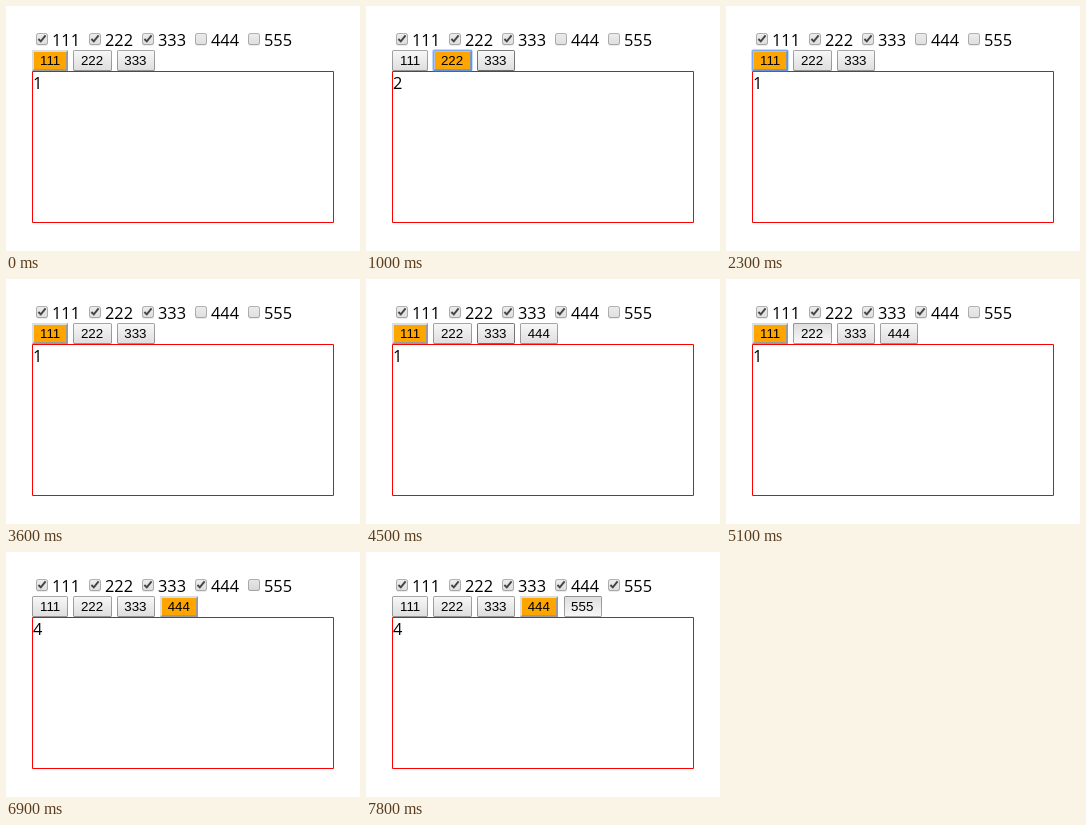
An HTML page with a canvas that plays this animation: 354 by 245 pixels, repeating every 8000 ms.

```html
<!DOCTYPE html>
<html lang="en">
<head>
<meta charset="utf-8">
<title>Checkbox tabs</title>
<style>
  html, body { margin: 0; width: 100%; height: 100%; overflow: hidden; background: #fff; }
  canvas { display: block; }
</style>
</head>
<body>
<canvas id="stage" width="354" height="245"></canvas>
<script>
const ctx = document.getElementById('stage').getContext('2d');
const LOOP = 8000;
const LABELS = ['111', '222', '333', '444', '555'];
const LABEL_FONT = '16.4px "Open Sans", "Noto Sans", sans-serif';
const BUTTON_FONT = '13.333px "Liberation Sans", Arial, sans-serif';
const RING = '77,144,254';
const NONE = -1;

const START = {
  tab: 0, hover: NONE, press: NONE, focus: NONE,
  boxHover: NONE, boxPress: NONE, checked: 3
};

const hover = i => ({ hover: i });
const press = i => ({ hover: i, press: i });
const click = i => ({ hover: i, press: NONE, focus: i, tab: i });
const pressBox = i => ({ hover: NONE, focus: NONE, boxPress: i });
const check = i => ({ boxPress: NONE, boxHover: i, checked: i + 1 });

const STEPS = [
  [600, hover(1)], [800, press(1)], [900, click(1)], [1000, hover(2)],
  [1400, press(2)], [1500, click(2)],
  [1700, hover(1)], [1800, hover(NONE)], [1900, hover(0)],
  [2200, press(0)], [2300, click(0)],
  [2500, hover(1)], [2700, hover(2)], [2900, hover(NONE)],
  [3600, { focus: NONE }], [4100, pressBox(3)], [4200, check(3)],
  [4400, { boxHover: NONE, hover: 3 }], [4500, hover(2)], [4600, hover(1)],
  [4800, hover(2)], [4900, hover(1)],
  [5100, press(1)], [5200, click(1)], [5300, hover(2)],
  [5600, press(2)], [5700, click(2)], [5800, hover(3)],
  [6000, press(3)], [6100, click(3)],
  [6900, pressBox(4)], [7100, check(4)],
  [7400, { boxHover: NONE }], [7500, hover(4)], [7800, press(4)]
];

function stateAt(t) {
  const s = { ...START };
  for (const [at, change] of STEPS) if (at <= t) Object.assign(s, change);
  return s;
}

function text(str, x, y, font) {
  ctx.font = font;
  ctx.fillStyle = '#000';
  ctx.fillText(str, x, y);
}

function gradient(y, h, top, bottom) {
  const g = ctx.createLinearGradient(0, y, 0, y + h);
  g.addColorStop(0, top);
  g.addColorStop(1, bottom);
  return g;
}

function roundBox(x, y, w, h, r) {
  ctx.beginPath();
  ctx.roundRect(x, y, w, h, r);
}

function strokeBox(x, y, w, h, r, color, width = 1) {
  ctx.strokeStyle = color;
  ctx.lineWidth = width;
  roundBox(x + .5, y + .5, w - 1, h - 1, r);
  ctx.stroke();
}

function polygon(points, color) {
  ctx.fillStyle = color;
  ctx.beginPath();
  points.forEach(([x, y]) => ctx.lineTo(x, y));
  ctx.fill();
}

function drawCheckbox(i, s) {
  const x = 30 + 53 * i, y = 27, size = 12;
  const hot = s.boxHover === i, down = s.boxPress === i;
  if (!down) {
    ctx.fillStyle = 'rgba(0,0,0,.08)';
    roundBox(x, y + 1, size, size, 2);
    ctx.fill();
  }
  ctx.fillStyle = down ? gradient(y, size, '#e7e7e7', '#d7d7d7')
    : hot ? gradient(y, size, '#f0f0f0', '#e0e0e0')
    : gradient(y, size, '#ededed', '#dedede');
  roundBox(x, y, size, size, 2);
  ctx.fill();
  strokeBox(x, y, size, size, 2, hot ? 'rgba(0,0,0,.3)' : 'rgba(0,0,0,.25)');

  if (i < s.checked) {
    ctx.strokeStyle = '#444';
    ctx.lineWidth = size * .16;
    ctx.beginPath();
    ctx.moveTo(x + size * .2, y + size * .5);
    ctx.lineTo(x + size * .4, y + size * .7);
    ctx.lineTo(x + size * .8, y + size * .2);
    ctx.stroke();
  }
  text(LABELS[i], x + 16, 40, LABEL_FONT);
}

function drawButton(i, s) {
  const left = i ? 66.9 + 43.4 * (i - 1) : 26;
  const x = i > 1 ? Math.ceil(left) : Math.round(left);
  const y = 44, h = 21;
  const w = i === 0 ? 36 : i === 1 ? 39 : 38;
  const r = x + w, b = y + h;

  if (s.tab === i) {
    polygon([[x, y], [r, y], [r - 2, y + 2], [x + 2, b - 2], [x, b]], '#ddd');
    polygon([[r, b], [x, b], [x + 2, b - 2], [r - 2, y + 2], [r, y]], '#9a9a9a');
    ctx.fillStyle = '#ffa500';
    ctx.fillRect(x + 2, y + 2, w - 4, h - 4);
  } else {
    const down = s.press === i;
    ctx.fillStyle = down ? gradient(y, h, '#ddd', '#f8f8f8') : gradient(y, h, '#f8f8f8', '#ddd');
    roundBox(x, y, w, h, 1);
    ctx.fill();
    const hot = s.hover === i && !down;
    strokeBox(x, y, w, h, 1, `rgba(0,0,0,${hot ? .5 : .333})`);
  }
  if (s.focus === i) {
    strokeBox(x, y, w, h, 1.5, `rgba(${RING},.35)`, 3);
    strokeBox(x, y, w, h, 1, `rgba(${RING},.5)`);
  }
  text(LABELS[i], left + 8, 59, BUTTON_FONT);
}

function draw(t) {
  const s = stateAt(t);
  ctx.fillStyle = '#fff';
  ctx.fillRect(0, 0, 354, 245);
  strokeBox(26, 65, 302, 152, 0, '#f00');
  text(String(s.tab + 1), 27, 83, LABEL_FONT);
  LABELS.forEach((_, i) => drawCheckbox(i, s));
  for (let i = 0; i < s.checked; i++) drawButton(i, s);
}

const begin = performance.now();
function tick() {
  draw((performance.now() - begin) % LOOP);
  requestAnimationFrame(tick);
}
tick();
</script>
</body>
</html>
```
